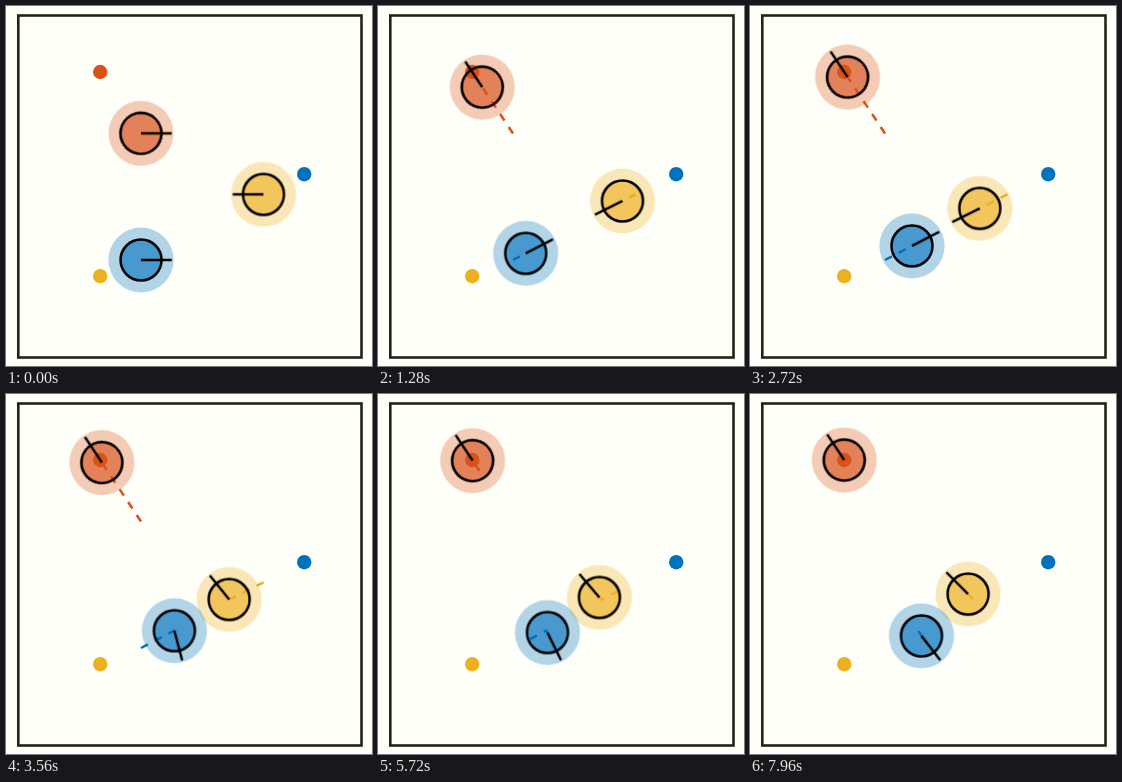
Animation of 366 by 360 pixels, one loop 8000 ms. Source, as an HTML page without scripts:

```html
<!DOCTYPE html>
<html lang="en">
<head>
<meta charset="utf-8">
<title>Three robots</title>
<style>
  html, body { margin: 0; width: 100%; height: 100%; overflow: hidden; background: #fffffa; }
  svg { display: block; width: 100%; height: 100%; }

  .orange { --c: #d95319; }
  .blue { --c: #0072bd; }
  .yellow { --c: #edb120; }

  .goal, .robot { fill: var(--c); }
  .trail { fill: none; stroke: var(--c); stroke-width: 2.5; stroke-dasharray: 7.8 7.7; }
  .trail, .robot, .nose { animation: 8s linear infinite; }
  .nose { stroke: #000; stroke-width: 2.5; }

  .orange.trail { animation-name: orange-trail; }
  .orange.robot { animation-name: orange-move; }
  .orange .nose { animation-name: orange-turn; }
  .blue.trail { animation-name: blue-trail; }
  .blue.robot { animation-name: blue-move; }
  .blue .nose { animation-name: blue-turn; }
  .yellow.trail { animation-name: yellow-trail; }
  .yellow.robot { animation-name: yellow-move; }
  .yellow .nose { animation-name: yellow-turn; }

  /* Orange: distance left to its goal, decaying */
  @keyframes orange-move {
    0% { transform: translateX(73.8px); }
    1% { transform: translateX(64.6px); }
    2% { transform: translateX(57px); }
    4% { transform: translateX(45.7px); }
    6% { transform: translateX(37px); }
    9% { transform: translateX(28px); }
    12% { transform: translateX(23.2px); }
    16% { transform: translateX(18.2px); }
    20% { transform: translateX(14px); }
    24.5% { transform: translateX(10.5px); }
    32% { transform: translateX(6.7px); }
    44.5% { transform: translateX(3.1px); }
    59.5% { transform: translateX(1.3px); }
    83.5% { transform: translateX(.3px); }
    100% { transform: translateX(.1px); }
  }
  /* Trails hold the last four seconds */
  @keyframes orange-trail {
    0% { d: path("M73.8 0L73.8 0"); }
    2% { d: path("M73.8 0L57 0"); }
    4% { d: path("M73.8 0L45.7 0"); }
    9% { d: path("M73.8 0L28 0"); }
    16% { d: path("M73.8 0L18.2 0"); }
    24.5% { d: path("M73.8 0L10.5 0"); }
    44.5% { d: path("M73.8 0L3.1 0"); }
    50% { d: path("M73.8 0L2.2 0"); }
    51% { d: path("M64.6 0L2.1 0"); }
    52% { d: path("M57 0L2 0"); }
    54% { d: path("M45.7 0L1.8 0"); }
    56% { d: path("M37 0L1.6 0"); }
    59% { d: path("M28 0L1.3 0"); }
    62% { d: path("M23.2 0L1.2 0"); }
    66% { d: path("M18.2 0L1 0"); }
    74.5% { d: path("M10.5 0L.6 0"); }
    82% { d: path("M6.7 0L.3 0"); }
    94.5% { d: path("M3.1 0L.2 0"); }
    100% { d: path("M2.2 0L.1 0"); }
  }
  @keyframes orange-turn {
    0%, .49% { transform: rotate(-56.4deg); }
    .5%, 100% { transform: rotate(180deg); }
  }

  /* Blue and yellow: straight run, then a slow sidestep on contact */
  @keyframes blue-move {
    0% { transform: translate(135px, 254px); }
    42% { transform: translate(168.3px, 236.6px); }
    59.5% { transform: translate(169px, 237.5px); }
    83.5% { transform: translate(169.9px, 239.6px); }
    100% { transform: translate(171.5px, 242px); }
  }
  @keyframes blue-trail {
    0% { d: path("M135 254L135 254L135 254"); }
    42% { d: path("M135 254L168.3 236.6L168.3 236.6"); }
    50% { d: path("M135 254L168.3 236.6L168.6 237"); }
    92% { d: path("M168.3 236.6L168.3 236.6L170.7 240.8"); }
    100% { d: path("M168.6 237L168.6 237L171.5 242"); }
  }
  @keyframes blue-turn {
    0%, .49% { transform: rotate(0deg); }
    .5%, 41.99% { transform: rotate(-27.3deg); }
    42% { transform: rotate(76.5deg); }
    44.5% { transform: rotate(75.3deg); }
    59.5% { transform: rotate(68.6deg); }
    83.5% { transform: rotate(59.1deg); }
    100% { transform: rotate(52deg); }
  }
  @keyframes yellow-move {
    0% { transform: translate(257.5px, 188.4px); }
    42% { transform: translate(223.3px, 205.6px); }
    59.5% { transform: translate(222.3px, 204.5px); }
    83.5% { transform: translate(220.5px, 202.4px); }
    100% { transform: translate(218px, 200px); }
  }
  @keyframes yellow-trail {
    0% { d: path("M257.5 188.4L257.5 188.4L257.5 188.4"); }
    42% { d: path("M257.5 188.4L223.3 205.6L223.3 205.6"); }
    50% { d: path("M257.5 188.4L223.3 205.6L222.8 205.1"); }
    92% { d: path("M223.3 205.6L223.3 205.6L219.2 201.2"); }
    100% { d: path("M222.8 205.1L222.8 205.1L218 200"); }
  }
  @keyframes yellow-turn {
    0%, .49% { transform: rotate(180deg); }
    .5%, 41.99% { transform: rotate(153.5deg); }
    42% { transform: rotate(231.2deg); }
    59.5% { transform: rotate(230.7deg); }
    83.5% { transform: rotate(228.3deg); }
    100% { transform: rotate(225deg); }
  }
</style>
</head>
<body>
<svg viewBox="0 0 366 360">
  <defs>
    <g id="body">
      <circle r="32.6" fill-opacity=".3"/>
      <circle r="20.5" fill-opacity=".6" stroke="#000" stroke-width="2.5"/>
    </g>
  </defs>

  <rect x="12.3" y="9.5" width="343.2" height="342" fill="none" stroke="#222218" stroke-width="2.6"/>

  <circle class="goal orange" cx="94.2" cy="66" r="7.2"/>
  <circle class="goal blue" cx="298.2" cy="168.2" r="7.2"/>
  <circle class="goal yellow" cx="94.2" cy="270.2" r="7.2"/>

  <path class="trail blue" d="M135 254L135 254L135 254"/>
  <path class="trail yellow" d="M257.5 188.4L257.5 188.4L257.5 188.4"/>

  <!-- x axis runs from the goal back to the start -->
  <g transform="translate(94.2 66) rotate(56.4)">
    <path class="trail orange" d="M73.8 0L73.8 0"/>
    <g class="robot orange">
      <use href="#body"/>
      <path class="nose" d="M0 0H30.7"/>
    </g>
  </g>
  <g class="robot yellow">
    <use href="#body"/>
    <path class="nose" d="M0 0H30.7"/>
  </g>
  <g class="robot blue">
    <use href="#body"/>
    <path class="nose" d="M0 0H30.7"/>
  </g>
</svg>
</body>
</html>
```
